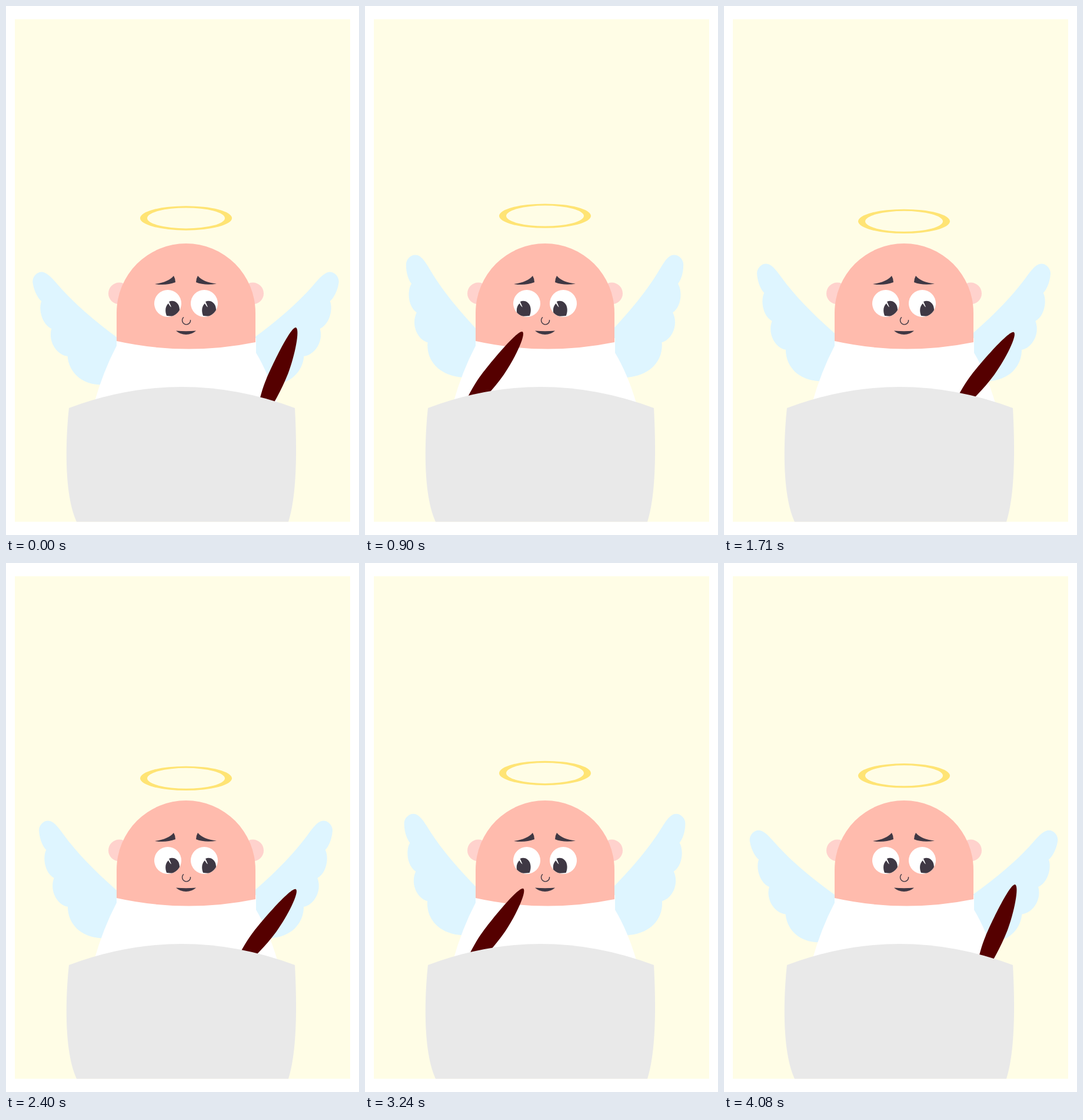
Recreate the animation shown at these times as an HTML page. Size 600x900 px, loop 4110 ms.

```html
<!DOCTYPE html>
<html lang="en">
<head>
<meta charset="utf-8">
<title>Writing angel</title>
<style>
html, body { margin: 0; width: 100%; height: 100%; overflow: hidden; background: #fff; }
svg { display: block; width: 600px; height: 900px; }
</style>
</head>
<body>
<svg viewBox="0 0 600 900">
  <defs>
    <path id="wing" fill="#def5ff" d="M240 600C180 552 130 505 98 460C90 449 84 441 76 438C66 435 56 445 57 455C58 470 64 482 69 487C63 498 65 525 82 535C74 555 86 580 105 584C105 612 125 636 163 638C190 640 215 630 240 600Z"/>
    <path id="pupil" fill="#3f3844" d="M-10 12.5C-14 2-11-5-7-8.5Q-5-4-2-2Q-4-7-6-11.5C1-15 8-11 10.5-5C13 1 12 8 10 12.5Q0 14-10 12.5Z"/>
    <clipPath id="eyes"><circle cx="275" cy="506" r="23"/><circle cx="337" cy="506" r="23"/></clipPath>
  </defs>
  <path fill="#fffde6" d="M15 22.5H585V877.5H15Z"/>
  <use id="left" href="#wing"/>
  <g transform="matrix(-1 0 0 1 611 0)"><use id="right" href="#wing"/></g>
  <path id="halo" fill="#ffe474" fill-rule="evenodd" d="M228 0a78 20.7 0 0 1 156 0a78 20.7 0 0 1-156 0ZM240 0a66 17.5 0 0 0 132 0a66 17.5 0 0 0-132 0Z"/>
  <path fill="#fff" d="M188 565V578Q165 622 150 675H461Q446 625 425 590V565Z"/>
  <g fill="#ffd2cd"><circle cx="192.5" cy="489" r="18.5"/><circle cx="419.5" cy="489" r="18.5"/></g>
  <path fill="#ffbbad" d="M188 570V522A118 118 0 0 1 424 522V572Q306 596 188 570Z"/>
  <g fill="#3f3844">
    <path d="M253 473Q276 470 285 459Q288 464 288 470Q272 476 253 473Z"/>
    <path d="M358 472.5Q335 470 326 459Q323 464 323 470Q338 476 358 472.5Z"/>
    <path d="M289 552.5Q306 554 323 552.5Q316 559 306 559Q296 559 289 552.5Z"/>
    <path fill="none" stroke="#3f3844" stroke-width="1.4" d="M302 529.5A7 7 0 1 0 313.5 534"/>
  </g>
  <g fill="#fff"><circle cx="275" cy="506" r="23"/><circle cx="337" cy="506" r="23"/></g>
  <g clip-path="url(#eyes)">
    <g id="look"><use href="#pupil"/><use href="#pupil" x="62"/></g>
  </g>
  <path id="quill" fill="#550000" d="M0 0C8 0 16 45 16.5 78C16.5 110 12 135 8 165H-8C-13 135-15 115-14.5 100C-13.5 65-8 0 0 0Z"/>
  <path fill="#e9e9e9" d="M107 684Q298 612 491 684C495 760 494 832 480 877.5H120C100 835 100 750 107 684Z"/>
</svg>
<script>
const TAU = 2 * Math.PI, STEP = 30, STEPS = 137;
const set = (id, value) => document.getElementById(id).setAttribute('transform', value);
const wave = (step, period) => Math.cos(TAU * step / period);

function draw(now) {
  // The motion runs forward for half the loop, then backward.
  const index = Math.floor(now / STEP) % STEPS;
  const k = Math.min(index, STEPS - index);

  const flap = `rotate(${-5.9 * wave(k - 1.8, 20)} 240 595)`;
  set('left', flap);
  set('right', flap);
  set('halo', `translate(0 ${362.5 + 5.6 * wave(k - 11.8, 40)})`);
  set('look', `translate(${276.3 + 6.8 * wave(k + 1, 57)} 514.5)`);

  const tilt = 31 - 9.5 * wave(k - 2, 85);
  const x = 381.5 + 114 * wave(k - 2, 57);
  const y = 605.6 - 63 * Math.cos(tilt * TAU / 360);
  set('quill', `translate(${x} ${y}) rotate(${tilt})`);
}

const start = performance.now();
function tick() {
  draw(performance.now() - start);
  requestAnimationFrame(tick);
}
tick();
</script>
</body>
</html>
```
